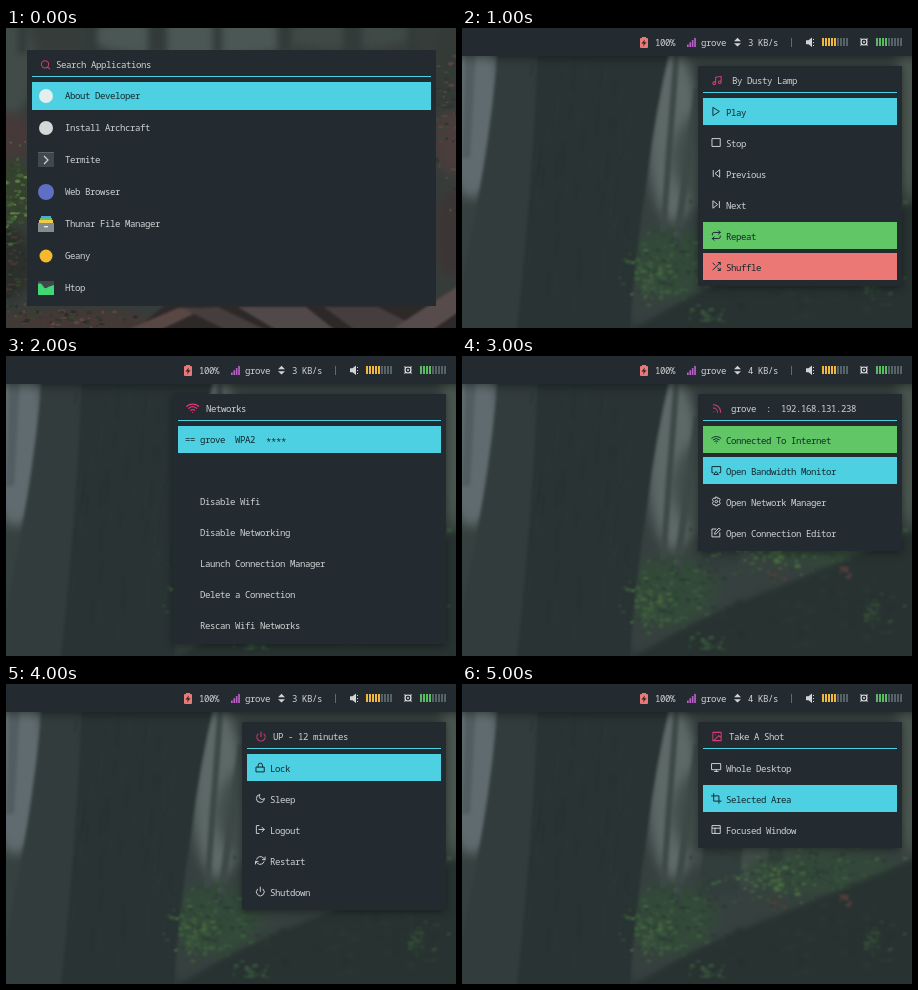
Animation of 450x300 px, one loop 6 s. Source, as an HTML page:

```html
<!DOCTYPE html>
<html lang="en">
<head>
<meta charset="utf-8">
<title>Desktop menus</title>
<style>
  html, body { margin: 0; width: 100%; height: 100%; overflow: hidden; background: #2c3637; }
  #stage { position: relative; width: 450px; height: 300px; overflow: hidden; }
  #strip { position: absolute; left: 0; top: 0; width: 2700px; height: 300px; display: flex; animation: scenes 6s steps(6) infinite; }
  svg { display: block; flex: none; width: 450px; height: 300px; overflow: hidden; }
  text { font: 9px "Noto Sans Mono", "DejaVu Sans Mono", monospace; letter-spacing: -.4px; white-space: pre; }
  .panel { filter: drop-shadow(0 2px 4px #0006); }
  .icon { fill: none; stroke-width: 2.2; stroke-linecap: round; stroke-linejoin: round; }
  @keyframes scenes { to { transform: translateX(-2700px); } }
</style>
</head>
<body>
<div id="stage"><div id="strip"></div></div>
<script>
const PANEL = '#232b31', CYAN = '#4dd0e1', GREEN = '#61c766', RED = '#ec7875',
      PINK = '#dc3a78', LIGHT = '#d0d4d4', DARK = '#14272d';
const NETWORK = 'grove';

const ICONS = {
  search: 'M19 11a8 8 0 1 1-16 0a8 8 0 0 1 16 0M21 21l-4.3-4.3',
  music: 'M9 18V5l12-2v13M9 18a3 3 0 1 1-6 0a3 3 0 0 1 6 0M21 16a3 3 0 1 1-6 0a3 3 0 0 1 6 0',
  play: 'M5 3l14 9-14 9z',
  stop: 'M3 3h18v18H3z',
  previous: 'M19 20L9 12l10-8zM5 19V5',
  next: 'M5 4l10 8-10 8zM19 5v14',
  repeat: 'M17 1l4 4-4 4M3 11V9a4 4 0 0 1 4-4h14M7 23l-4-4 4-4M21 13v2a4 4 0 0 1-4 4H3',
  shuffle: 'M16 3h5v5M4 20L21 3M21 16v5h-5M15 15l6 6M4 4l5 5',
  wifi: 'M5 12.5a11 11 0 0 1 14 0M1.4 9a16 16 0 0 1 21.2 0M8.5 16a6 6 0 0 1 7 0M12 20h.01',
  feed: 'M4 11a9 9 0 0 1 9 9M4 4a16 16 0 0 1 16 16M5 19h.01',
  cast: 'M5 17H2V3h20v14h-3M12 15l5 6H7z',
  gear: 'M15 12a3 3 0 1 1-6 0a3 3 0 0 1 6 0M10 2h4l1 3 3-1 3 4-2 3v2l2 3-3 4-3-1-1 3h-4l-1-3-3 1-3-4 2-3v-2L3 8l3-4 3 1z',
  edit: 'M11 4H2v18h18v-9M18.5 2.5l3 3L12 15l-4 1 1-4z',
  power: 'M18.4 6.6a9 9 0 1 1-12.8 0M12 2v10',
  lock: 'M3 11h18v11H3zM7 11V7a5 5 0 0 1 10 0v4',
  moon: 'M21 12.8A9 9 0 1 1 11.2 3 7 7 0 0 0 21 12.8z',
  logout: 'M9 21H3V3h6M16 17l5-5-5-5M21 12H9',
  restart: 'M23 4v6h-6M1 20v-6h6M3.5 9a9 9 0 0 1 14.9-3.4L23 10M1 14l4.6 4.4A9 9 0 0 0 20.5 15',
  image: 'M3 3h18v18H3zM21 15l-5-5L5 21M8 8h.5',
  desktop: 'M2 3h20v14H2zM8 21h8M12 17v4',
  crop: 'M6 1v17h17M1 6h17v17',
  layout: 'M3 3h18v18H3zM3 9h18M9 21V9'
};

const rect = (x, y, w, h, fill, extra = '') =>
  `<rect x="${x}" y="${y}" width="${w}" height="${h}" fill="${fill}" ${extra}/>`;
const circle = (x, y, r, fill) => `<circle cx="${x}" cy="${y}" r="${r}" fill="${fill}"/>`;
const blob = (x, y, rx, ry, fill) => `<ellipse cx="${x}" cy="${y}" rx="${rx}" ry="${ry}" fill="${fill}"/>`;
const shape = (d, fill) => `<path d="${d}" fill="${fill}"/>`;
const text = (x, y, s, fill = LIGHT) => `<text x="${x}" y="${y}" fill="${fill}">${s}</text>`;
const icon = (name, x, y, color = LIGHT, size = 10.5) =>
  `<path class="icon" d="${ICONS[name]}" stroke="${color}" transform="translate(${x - size / 2} ${y - size / 2}) scale(${size / 24})"/>`;
const soft = (amount, content) => `<g style="filter:blur(${amount}px)">${content}</g>`;
const svg = content => `<svg viewBox="0 0 450 300">${content}</svg>`;
const repeat = (n, draw) => Array.from({ length: n }, (_, i) => draw(i)).join('');

let seed = 7;
const random = () => (seed = seed * 16807 % 2147483647) / 2147483647;
const spread = () => random() + random() + random() - 1.5;
const leaves = (n, x, y, rx, ry, colors) => repeat(n, () =>
  blob(x + spread() * rx, y + spread() * ry, 1 + random() * 2.5, .7 + random() * 1.3, colors[Math.floor(random() * colors.length)]));

function forest() {
  const mist = soft(6,
    rect(-20, -20, 490, 340, '#36413f') +
    blob(10, 85, 32, 85, '#5f6b6e') +
    blob(212, 110, 26, 85, '#5d6967') +
    blob(300, 130, 90, 70, '#414d4a') +
    blob(446, 90, 14, 80, '#4a5650') +
    blob(208, 235, 45, 34, '#34493a') +
    blob(360, 188, 75, 22, '#34483a') +
    blob(60, 310, 120, 40, '#2c3636'));
  const trunks = soft(1.6,
    shape('M4 20L14 20 8 130 0 130z', '#515d60') +
    shape('M36 20L82 20 64 310-14 310Q26 150 36 20z', '#323c3d') +
    shape('M212 20L218 20 204 205 198 205zM232 60L240 60 218 215 211 215z', '#3d4947') +
    shape('M250 80L290 80 276 210 236 212z', '#323e3c') +
    shape('M310 100L326 100 320 180 306 185z', '#35413e') +
    shape('M76 20L208 20Q193 85 185 150Q174 220 168 300L54 310Q70 170 76 20z', '#293334'));
  const bark = soft(.8, repeat(60, () => {
    const x = 66 + random() * 105, y = 25 + random() * 240;
    return `<path d="M${x} ${y}q-1 10-2 ${10 + random() * 25}" fill="none" stroke="${random() < .5 ? '#2e3939' : '#262f30'}"/>`;
  }));
  const undergrowth = soft(1,
    leaves(200, 215, 238, 50, 40, ['#2f4836', '#3b5c3e', '#2b3c33', '#344b3a']) +
    leaves(50, 190, 252, 18, 28, ['#46683f', '#3c5b3d']) +
    leaves(180, 345, 190, 90, 28, ['#33503a', '#405c41', '#2c3e34', '#2e4035']) +
    leaves(40, 315, 200, 55, 16, ['#4a6a43', '#41603f']));
  const log = soft(2.5,
    shape('M165 305Q225 268 275 247Q350 218 460 172V310H160z', '#283331') +
    leaves(70, 350, 255, 110, 45, ['#2d3936', '#222c2b', '#323e39'])) +
    soft(.8, leaves(9, 320, 219, 12, 7, ['#50403d', '#453e3b']) +
      leaves(8, 382, 214, 10, 7, ['#563f3e', '#463d3a']) +
      leaves(24, 250, 288, 20, 12, ['#38553c', '#304538']) +
      leaves(25, 418, 262, 32, 18, ['#334a37', '#2d3d34']));
  return mist + trunks + bark + undergrowth + log;
}

function boardwalk() {
  const base = soft(5,
    rect(-20, -20, 490, 340, '#363c3a') +
    blob(190, 8, 110, 22, '#4b5754') +
    blob(340, 6, 70, 16, '#3f4946') +
    blob(5, 35, 24, 50, '#414c49') +
    blob(5, 108, 20, 24, '#46393a') +
    blob(5, 165, 20, 34, '#36422f') +
    blob(5, 235, 20, 36, '#2c2f2b') +
    blob(70, 294, 75, 12, '#453836') +
    blob(446, 40, 20, 45, '#343a36') +
    blob(446, 115, 18, 32, '#4a3d3b') +
    blob(446, 205, 18, 45, '#3b3635'));
  const trunks = soft(3, repeat(7, i => rect(12 + i * 65, -8, 9 + i % 3 * 5, 34, '#323b39')));
  const planks = soft(1,
    shape('M120 310L160 276 460 276V310z', '#2e2929') +
    shape('M118 303L172 280 200 280 152 303z', '#594744') +
    shape('M178 281L212 279 262 303 222 303z', '#463d3d') +
    shape('M232 279L300 279 330 303 272 303z', '#514849') +
    shape('M318 279L372 279 420 303 350 303z', '#453d3e') +
    shape('M388 300L455 256 455 282 425 303z', '#574b4b'));
  const plants = soft(.7,
    leaves(90, 6, 170, 18, 45, ['#45603a', '#5c7a45', '#30402c', '#394c32']) +
    leaves(60, 5, 245, 20, 40, ['#333c2e', '#272d29', '#433734']) +
    leaves(80, 50, 290, 65, 14, ['#39442f', '#292e2a', '#594542', '#30382c']) +
    leaves(60, 442, 95, 14, 90, ['#3f443c', '#303732', '#544340']));
  return base + trunks + planks + plants;
}

function topBar() {
  const meter = (x, lit, color) => repeat(9, i => rect(x + i * 3, 10, 2, 8, i < lit ? color : '#566469'));
  const spokes = repeat(4, i => `<path d="M402 9v2" transform="rotate(${45 + i * 90} 402 14)"/>`);
  return `<g class="panel">${rect(-10, -10, 470, 38, PANEL)}</g>` +
    rect(180, 9, 4, 2, RED) + rect(178, 10, 8, 10, RED, 'rx="1"') +
    shape('M182.8 11.5L179.5 15.5H181.7L181 18.5 184.5 14.3H182.3z', PANEL) +
    text(193, 18, '100%') +
    repeat(4, i => rect(225 + i * 2.4, 16.5 - i * 2.2, 1.7, 2.5 + i * 2.2, '#b75fc4')) +
    text(239, 18, NETWORK) +
    shape('M272 13.2L275.5 9.8 279 13.2zM272 15.2L275.5 18.6 279 15.2z', LIGHT) +
    rect(329, 10, 1, 9, '#626b6f') +
    shape('M344 12.3H346.5L350 9.5V19L346.5 16.3H344z', LIGHT) +
    rect(351, 11, 1, 1, LIGHT) + rect(351, 14, 1, 1, LIGHT) + rect(351, 17, 1, 1, LIGHT) +
    meter(360, 5, '#f1b83e') +
    `<g fill="none" stroke="#dde1e1" stroke-width="1.2"><circle cx="402" cy="14" r="3"/>${spokes}</g>` +
    circle(402, 14, 1, '#dde1e1') +
    meter(414, 4, '#58bd61');
}

const panel = (x, y, w, h) => `<g class="panel">${rect(x, y, w, h, PANEL)}</g>`;

// Each row is [icon, label, highlight colour].
function menu({ rate = 3, title, titleX = 267, head, height, rows }) {
  return svg(text(286, 18, rate + ' KB/s') + panel(236, 38, 204, height) +
    icon(head, 255, 52.5, PINK, 11) + text(titleX, 56, title) + rect(241, 64, 194, 1, CYAN) +
    rows.map(([name, label, color], i) => {
      const y = 70 + i * 31, ink = color ? DARK : LIGHT;
      return (color ? rect(241, y, 194, 27, color) : '') + icon(name, 254.3, y + 13.5, ink) + text(264, y + 18, label, ink);
    }).join(''));
}

function launcher() {
  const appIcons = [
    y => circle(40, y, 7, '#e4eeee'),
    y => circle(40, y, 7, '#d4d8d8'),
    y => rect(32, y - 8, 16, 15, '#41494c') + rect(32, y - 8, 16, 1, '#5b6467') +
      `<path d="M38 ${y - 4}l4 4-4 4" fill="none" stroke="#d0d4d4" stroke-width="1.2"/>`,
    y => circle(40, y, 8, '#5f6fc4'),
    y => rect(35, y - 8, 10, 3, '#4aa7e0') + rect(34, y - 6, 12, 3, '#63c267') + rect(33, y - 4, 14, 3, '#f2ca4c') +
      rect(32, y - 1, 16, 9, '#858c8e') + rect(38, y + 2, 4, 1.4, '#e5e8e8'),
    y => circle(40, y, 6.5, '#f6b82f'),
    y => rect(32, y - 7, 16, 14, '#3e474a') +
      shape(`M32 ${y - 4}q3-2 5 2t5 1q3-1 6-2V${y + 7}H32z`, '#42d675')
  ];
  const labels = ['About Developer', 'Install Archcraft', 'Termite', 'Web Browser', 'Thunar File Manager', 'Geany', 'Htop'];
  return svg(boardwalk() + rect(21, 22, 409, 256, PANEL) + icon('search', 39.5, 36.8, PINK, 11) +
    text(50, 40, 'Search Applications') + rect(26, 48, 399, 1, CYAN) + rect(26, 54, 399, 28, CYAN) +
    labels.map((label, i) => {
      const y = 68 + i * 32;
      return appIcons[i](y) + text(59, y + 3, label, i ? LIGHT : DARK);
    }).join(''));
}

function networks() {
  const actions = ['Disable Wifi', 'Disable Networking', 'Launch Connection Manager', 'Delete a Connection', 'Rescan Wifi Networks'];
  return svg(text(286, 18, '3 KB/s') + panel(167, 38, 273, 250) + icon('wifi', 186.7, 52, PINK, 13.5) +
    text(200, 56, 'Networks') + rect(172, 64, 263, 1, CYAN) + rect(172, 70, 263, 27, CYAN) +
    text(179, 87, `== ${NETWORK}  WPA2`, DARK) + text(260, 89, '****', DARK) +
    actions.map((label, i) => text(194, 149 + i * 31, label)).join(''));
}

const scenes = [
  launcher(),
  menu({ title: 'By Dusty Lamp', titleX: 270, head: 'music', height: 220, rows: [
    ['play', 'Play', CYAN], ['stop', 'Stop'], ['previous', 'Previous'], ['next', 'Next'],
    ['repeat', 'Repeat', GREEN], ['shuffle', 'Shuffle', RED]] }),
  networks(),
  menu({ rate: 4, title: `${NETWORK}  :  192.168.131.238`, titleX: 269, head: 'feed', height: 157, rows: [
    ['wifi', 'Connected To Internet', GREEN], ['cast', 'Open Bandwidth Monitor', CYAN],
    ['gear', 'Open Network Manager'], ['edit', 'Open Connection Editor']] }),
  menu({ title: 'UP - 12 minutes', head: 'power', height: 188, rows: [
    ['lock', 'Lock', CYAN], ['moon', 'Sleep'], ['logout', 'Logout'], ['restart', 'Restart'], ['power', 'Shutdown']] }),
  menu({ rate: 4, title: 'Take A Shot', head: 'image', height: 126, rows: [
    ['desktop', 'Whole Desktop'], ['crop', 'Selected Area', CYAN], ['layout', 'Focused Window']] })
];

document.getElementById('stage').insertAdjacentHTML('afterbegin', svg(forest() + topBar()));
document.getElementById('strip').innerHTML = scenes.join('');
</script>
</body>
</html>
```
